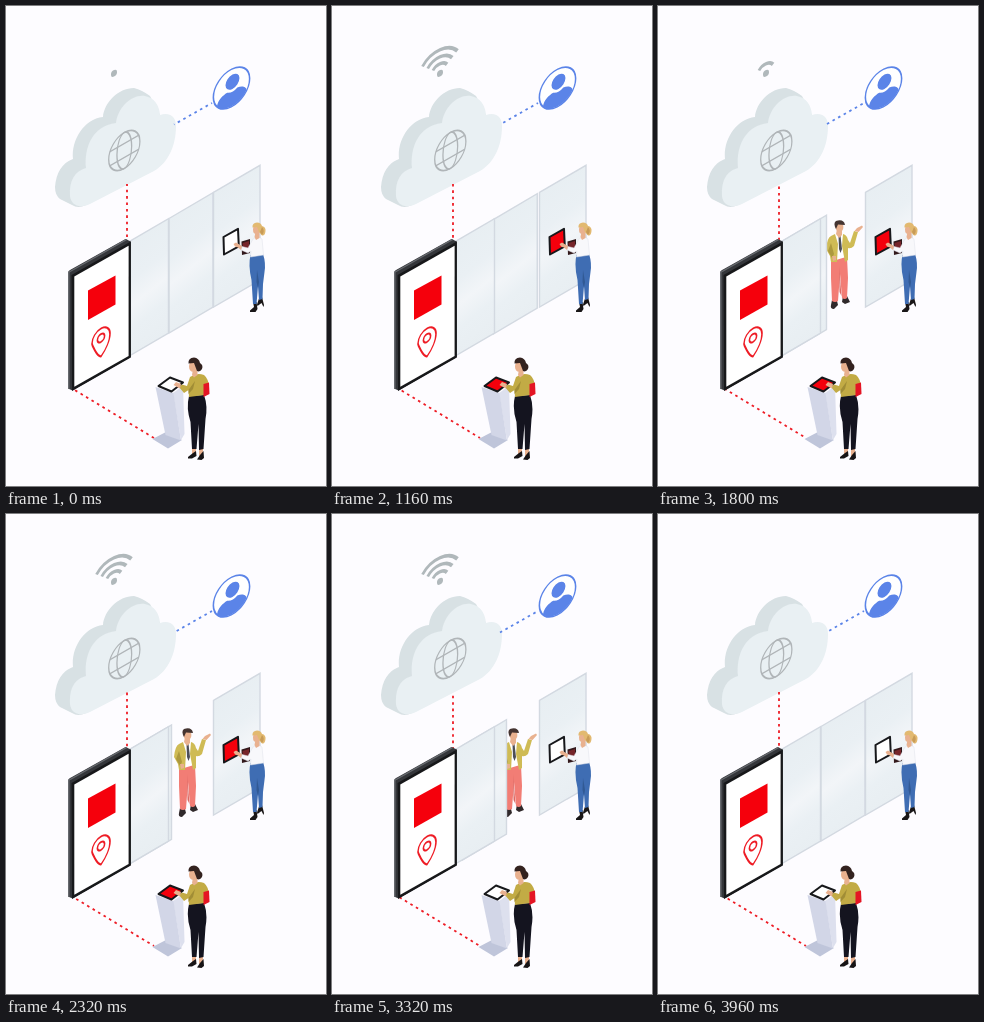
An HTML page for the animation above (4 s loop, 320 by 480 pixels).

```html
<!DOCTYPE html>
<html lang="en">
<head>
<meta charset="utf-8">
<title>Connected entrance</title>
<style>
  html, body { margin: 0; width: 100%; height: 100%; overflow: hidden; background: #fdfcff; }
  svg { display: block; width: 100%; height: 100%; }
  .dots { fill: none; stroke-width: 1.8; stroke-dasharray: 2.6 3.8; }
  .red { stroke: #ee1c25; }
  .blue { stroke: #5b84e8; }
  .door { fill: url(#glass); stroke: #d3d9e1; stroke-width: 1.4; }
  .skin { fill: #e9b18f; }
  .screen { fill: #fff; stroke: #17181b; stroke-width: 2; stroke-linejoin: round; }
</style>
</head>
<body>
<svg viewBox="0 0 320 480">
  <defs>
    <linearGradient id="glass" x1="0" y1="0" x2=".25" y2="1">
      <stop offset="0" stop-color="#e6edf1"/>
      <stop offset=".45" stop-color="#eaf0f4"/>
      <stop offset=".62" stop-color="#f2f5f8"/>
      <stop offset=".78" stop-color="#eaf0f4"/>
      <stop offset="1" stop-color="#e8eef2"/>
    </linearGradient>
    <clipPath id="badge"><circle r="18.3"/></clipPath>
  </defs>

  <!-- signal -->
  <g id="wifi" transform="matrix(.95 -.42 0 1 108 67.3)" fill="none" stroke="#b0b8bb" stroke-width="3.4"></g>

  <!-- cloud -->
  <path fill="#d8e1e4" d="M49 181C50 167 56 157 67 153C65 134 78 113 97 111C98 97 112 82 128 82Q136 84 144 90L154 109L80 199Q72 203 66 199L54 193Q49 189 49 181Z"/>
  <path fill="#e9f0f3" d="M64 190C63 174 69 165 80 162C78 142 86 120 110 117C112 101 126 88 139 90C148 92 153 98 154 109C163 106 170 110 170 120C170 140 162 157 148 165L84 198C73 203 65 199 64 190Z"/>
  <g transform="matrix(.866 -.5 0 1 118.3 144.5)" fill="none" stroke="#b0b5b8" stroke-width="1.5">
    <circle r="18"/>
    <ellipse rx="8.5" ry="18"/>
    <path d="M-16.6-7H16.6M-16.6 7H16.6"/>
  </g>

  <!-- user badge -->
  <g transform="matrix(.97 -.5 0 1 225.5 82)">
    <circle r="18.7" fill="#fff" stroke="#5b84e8" stroke-width="1.6"/>
    <g fill="#5b84e8" clip-path="url(#badge)">
      <circle cx="1" cy="-5.8" r="7.2"/>
      <path d="M-15 20V11C-14 5-9 3-4.500 2.500Q1 6 6 2.500C10 3 15 5 16 11V20Z"/>
    </g>
  </g>

  <path class="dots blue" data-start="4.3" d="M168 118.500L206 97"/>
  <path class="dots red" data-start="2.9" d="M121 234V178"/>
  <path class="dots red" data-start="0" d="M148 432L67 383"/>

  <!-- visitor behind the sliding door -->
  <g>
    <path fill="#30292b" d="M174 294L179 295L180 299L176 303Q172 303 173 299ZM185 290L189 290L192 296L187 298L184 296Z"/>
    <path fill="#f27d75" d="M173 251H189L190 272L189 292Q187 294 184 292L182 268L180 295Q177 297 174 295L173 272Z"/>
    <path fill="#dc6a65" d="M181 260L183.500 290L181.500 286Z"/>
    <path fill="#fff" d="M177 228L185 228L188 251L178 254Z"/>
    <path fill="#4d4e58" d="M180.500 230L182.500 230L184 243L182.500 247L181 243Z"/>
    <path fill="#cfbb55" d="M177 228L180 238L179 256L173 256L172 250L168 243Q169 232 173 230ZM185 228Q189 229 190 234L192 237L196 225L200 226L196 240Q193 243 190 242L190 254L187 256L184 240Z"/>
    <path fill="#ad993e" d="M173 237L176 248L174 252L170 245Z"/>
    <path class="skin" d="M179 223H184L184 229L181 232L178 228ZM196.500 225L199 222L204 219.500L205 221L200.500 226ZM174 250L178 250L178 254L175 255Z"/>
    <ellipse class="skin" cx="181.500" cy="221" rx="3.900" ry="5"/>
    <path fill="#443431" d="M177 221Q175 215 180 214.500Q186 213.500 187 219L180 218.500L178 223Z"/>
  </g>

  <!-- glass doors -->
  <path id="slider" class="door" d="M163 212.500L207 186.700V301L163 327Z"/>
  <path class="door" d="M118 238.700L162.500 212.700V327L118 353Z"/>
  <path class="door" d="M207.500 186.300L254 159.300V274L207.500 301Z"/>

  <!-- display panel -->
  <path fill="#34363a" d="M62 267Q62 265 64 264L119.500 233L124.800 235.500V351L66.500 384.500L62 382.500Z"/>
  <path fill="#17181a" d="M65.500 269L124.800 235.500V351.500L66 385Z"/>
  <path fill="#66696e" d="M62 266L120 233L121.500 233.700L63.500 266.500V383L62 382.500Z"/>
  <path fill="#fff" d="M68.300 270.500L122.600 239.800V350L68.300 380.700Z"/>
  <path fill="#f5000c" d="M82 284.500L109.500 269.500V298.500L82 314Z"/>
  <g transform="matrix(.9 -.5 0 1 95 334.500)" fill="none" stroke="#ee1c25" stroke-width="1.800" stroke-linejoin="round">
    <path d="M0 16C-5 13-10-1-10-2A10 10 0 0 1 10-2C10 5 5 12 0 16Z"/>
    <circle cy="-2.500" r="4"/>
  </g>

  <!-- wall tablet and its user -->
  <path id="wallScreen" class="screen" d="M217.500 231L232 222.800L232.800 240.300L218 248.500Z"/>
  <g>
    <path fill="#191617" d="M247 296L250.500 296L251.500 303L249.500 306L244 306L244 304.500L248 301ZM253.500 291L256 291L258 299L257.500 301L255.500 297L251.500 300L251 298.500Z"/>
    <path fill="#3f6db3" d="M244.500 249L257 248Q260 257 258.500 266L257 278L256.500 293L253 294L252 280L250.500 298L247 298L245.500 274Q242 259 244.500 249Z"/>
    <path fill="#315994" d="M251 264L253 276L252 282L250.500 276Z"/>
    <path fill="#32191b" d="M235.500 235.500L244 233L244 247L236 249Z"/>
    <path fill="#76252a" d="M236.500 237L243 235V243L237 245Z"/>
    <path fill="#f8f8fb" stroke="#dfe1e8" stroke-width=".5" d="M247 233Q252 229.500 256 233L257.500 249L244.500 251L245 245L242 247L235 244L236 240.500L242 242Z"/>
    <path class="skin" d="M249.500 226H253.500V232L250 234L248.500 231ZM236 240L230 236.500L227.500 238L229 240.500L232 241.500L235 244Z"/>
    <ellipse class="skin" cx="250.500" cy="223.500" rx="3.500" ry="4.600"/>
    <path fill="#e2b970" d="M246.500 221.500Q246 217 251 216.500Q255 216.500 256 220Q260 221 259.500 225Q259 230 256 229.500L253 226L251 221Z"/>
    <path fill="#c89b57" d="M256 221Q259.500 225 256 229L254 226Z"/>
  </g>

  <!-- kiosk -->
  <path fill="#bfc5da" d="M146.500 433L160 426L176 434L162 442.500Z"/>
  <path fill="#dde0ee" d="M167 387L177 380L178.500 428L175 434Z"/>
  <path fill="#d2d6e7" d="M149.500 381L167.500 387L175 434.500L159.500 429Z"/>
  <path id="kioskScreen" class="screen" d="M152.500 380L164 371.500L177 376.500L165.500 385.500Z"/>

  <!-- kiosk user -->
  <g>
    <path class="skin" d="M186 442H190V448L186 449ZM193 443H197V450L193 450Z"/>
    <path fill="#171416" d="M190 445L190.500 450L186 452.500L182 452.500L182 451L187 447ZM197.500 445L198 452L195.500 454L191 453.500L194 449Z"/>
    <path fill="#14141f" d="M183 390L198 389Q202 400 199.500 413L197.500 443L193 444L192.500 418L190.500 443L186 443L184.500 416Q180 402 183 390Z"/>
    <path fill="#c2ab45" d="M184 371Q191 366 198 369Q203 373 203 382L198 389L183 391L182.500 384L178 387L173 381L176 378.500L181 380Z"/>
    <path fill="#a18d36" d="M189 375L187 383L182.500 388L182.500 384Z"/>
    <path fill="#e41524" d="M197.500 378L203 376.500L203.500 388L197.500 391Z"/>
    <path class="skin" d="M175 378L170 376L167.500 379L171 381L174 382.500ZM187 363H191.500V369L188 371.500L186 369Z"/>
    <ellipse class="skin" cx="187" cy="360.500" rx="4" ry="5.300"/>
    <path fill="#33221f" d="M182.500 357.500Q182 352 188 351.500Q193 352 194 357Q197.500 359 196 363Q194 366.500 191 365L189.500 361L188 357Z"/>
  </g>
</svg>

<script>
const LOOP = 4000;
const DOT_GAP = 6.4, DOT_PERIOD = 400;
const SIGNAL_PERIOD = 2000, SIGNAL_STEP = 80, SIGNAL_OFF = 1960;
const DOOR_OPEN = [1040, 1960], DOOR_CLOSE = [3050, 3930];
const DOOR_TRAVEL = { x: -41.5, y: 24.3 };
const screens = [
  { id: 'kioskScreen', on: 800, off: 2800 },
  { id: 'wallScreen', on: 1000, off: 3000 }
];

const byId = id => document.getElementById(id);
const dots = document.querySelectorAll('.dots');
const slider = byId('slider');

function addSignal(tag, attributes) {
  const node = document.createElementNS('http://www.w3.org/2000/svg', tag);
  for (const name in attributes) node.setAttribute(name, attributes[name]);
  byId('wifi').append(node);
  return node;
}

const signal = [addSignal('circle', { r: 3.2, fill: '#b0b8bb', stroke: 'none' })];
for (const r of [9.5, 16.5, 23.5]) {
  const x = r * Math.sin(0.9), y = -r * Math.cos(0.9);
  signal.push(addSignal('path', { d: `M${-x} ${y}A${r} ${r} 0 0 1 ${x} ${y}` }));
}

// Sine ease between two times
function ease(t, [start, end]) {
  const p = Math.min(1, Math.max(0, (t - start) / (end - start)));
  return (1 - Math.cos(Math.PI * p)) / 2;
}

function render(t) {
  const shift = (t % DOT_PERIOD) / DOT_PERIOD * DOT_GAP;
  for (const line of dots) line.style.strokeDashoffset = -(+line.dataset.start + shift);

  const phase = t % SIGNAL_PERIOD;
  signal.forEach((part, i) => {
    const lit = phase >= i * SIGNAL_STEP && phase < SIGNAL_OFF - i * SIGNAL_STEP;
    part.style.visibility = lit ? 'visible' : 'hidden';
  });

  const open = ease(t, DOOR_OPEN) - ease(t, DOOR_CLOSE);
  slider.setAttribute('transform', `translate(${DOOR_TRAVEL.x * open} ${DOOR_TRAVEL.y * open})`);

  for (const { id, on, off } of screens) {
    byId(id).style.fill = t >= on && t < off ? '#f5000c' : '#fff';
  }
}

const began = performance.now();
function tick() {
  render((performance.now() - began) % LOOP);
  requestAnimationFrame(tick);
}
tick();
</script>
</body>
</html>
```
